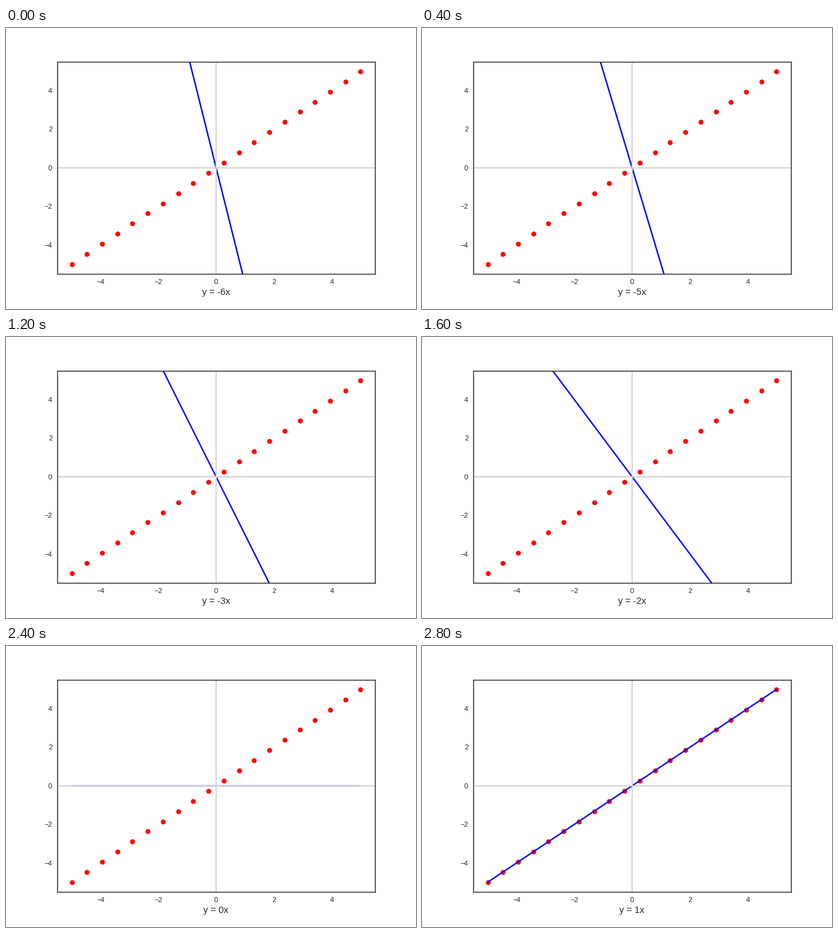
Write a matplotlib script that moves like this. It is 640 px wide and 440 px high and loops after 3.2 s.

```python
import matplotlib.pyplot as plt
import numpy as np
from matplotlib.animation import FuncAnimation

INK = "0.15"
SLOPES = range(-6, 2)

plt.rcParams.update({
    "font.family": "Liberation Sans",
    "font.size": 10,
    "text.color": INK,
    "axes.edgecolor": INK,
    "axes.linewidth": 1.25,
    "lines.solid_capstyle": "round",
})

fig = plt.figure(figsize=(8, 5.5), dpi=80, facecolor="white")
ax = fig.add_axes([0.125, 0.125, 0.775, 0.755])
ax.set(xlim=(-5.5, 5.5), ylim=(-5.5, 5.5))
ticks = np.arange(-4, 5, 2)
ax.set_xticks(ticks)
ax.set_yticks(ticks)
ax.tick_params(length=0, pad=7, labelsize=10, labelcolor=INK)

x = np.linspace(-5, 5, 20)
ax.plot(x, x, "o", color="red", markersize=7, markeredgewidth=0)
line, = ax.plot(x, SLOPES[0] * x, color="blue", linewidth=2)
ax.axhline(0, color="lightgray", linewidth=1.75)
ax.axvline(0, color="lightgray", linewidth=1.75)
label = fig.text(0.5125, 22 / 440, "", fontsize=13, ha="center", va="baseline")


def update(i):
    slope = SLOPES[i]
    line.set_ydata(slope * x)
    label.set_text(f"y = {slope}x")
    return line, label


anim = FuncAnimation(fig, update, frames=len(SLOPES), interval=400,
                     repeat=True, repeat_delay=0)
plt.show()
```
